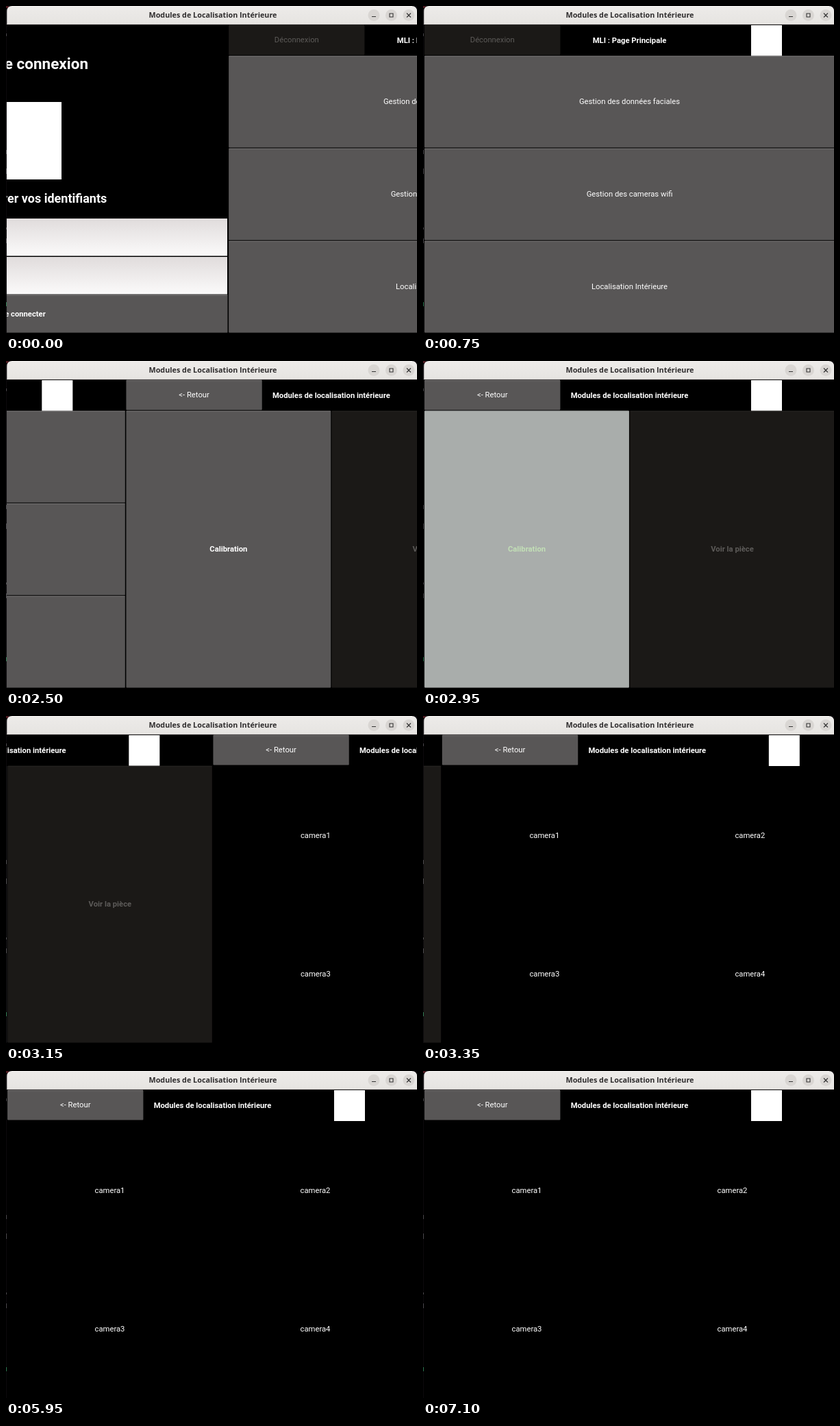
Write an HTML page that moves like this. It is 600 px wide and 477 px high and loops after 8 s.

```html
<!DOCTYPE html>
<html lang="fr">
<head>
<meta charset="utf-8">
<style>
html, body { margin: 0; width: 600px; height: 477px; overflow: hidden; background: #0b090c; }
svg { display: block; }
text { font: 11.25px Roboto, Arial, sans-serif; fill: #fff; text-anchor: middle; }
.bold { font-weight: 700; }
.off { fill: #5d5b59; }
.title { font: 700 10.8px "Open Sans", "Noto Sans", sans-serif; fill: #2f2d2e; }
.icon { fill: none; stroke: #333; stroke-width: 1.1; }
</style>
</head>
<body>
<svg width="600" height="477" viewBox="0 0 600 477">
  <defs>
    <linearGradient id="bar" x2="0" y2="1">
      <stop stop-color="#edebe9"/><stop offset="1" stop-color="#e6e4e1"/>
    </linearGradient>
    <linearGradient id="field" x2="0" y2="1">
      <stop stop-color="#e0dcdc"/><stop offset="1" stop-color="#fbfafa"/>
    </linearGradient>
  </defs>
  <g id="edge"></g>
  <svg id="pages" x="1" y="27" width="599" height="450" viewBox="1 27 599 450"></svg>
  <path d="M1.3 27V8Q1.3 0 9 0H592Q600 0 600 8V27Z" fill="url(#bar)"/>
  <path d="M8 .4H593" stroke="#f9f8f7" stroke-width=".8"/>
  <path d="M1.3 26.6H600" stroke="#cfccc9" stroke-width=".8"/>
  <text class="title" x="302" y="17">Modules de Localisation Intérieure</text>
  <g fill="#d9d6d3">
    <circle cx="537" cy="13.5" r="8.5"/><circle cx="562.5" cy="13.5" r="8.5"/><circle cx="588" cy="13.5" r="8.5"/>
  </g>
  <path class="icon" d="M534 15.5h6M560 11h5v5h-5zM585 10.5l6 6m0-6l-6 6"/>
</svg>
<script>
const LOOP = 8000, STEP = 50, SLIDE = 400, WIDTH = 600;
const X0 = 1.5, TOP = 27, BODY = 72, BOTTOM = 477, INSET = 0.6;
const GREY = '#585656', DARK = '#1b1917', PRESSED = '#a9adab';

const rect = (x, y, w, h, fill, extra = '') =>
  `<rect x="${x}" y="${y}" width="${w}" height="${h}" fill="${fill}" ${extra}/>`;

const label = (s, x, y, cls = '', size = 0) =>
  `<text x="${x}" y="${y}" class="${cls}"${size ? ` style="font-size:${size}px"` : ''}>${s}</text>`;

function button(s, x, y, w, h, { cls = '', off = false, id = '' } = {}) {
  const fill = off ? DARK : GREY;
  const shine = off ? '#242220' : '#706e6e';
  const body = rect(x + INSET, y + INSET, w - 2 * INSET, h - 2 * INSET, fill, 'rx="1"');
  const line = rect(x + 1, y + 1, w - 2, 1, shine);
  const text = label(s, x + w / 2, y + h / 2 + 3.9, cls + (off ? ' off' : ''));
  return `<g id="${id}">${body}${line}${text}</g>`;
}

const header = (action, name, off = false) =>
  button(action, X0, TOP, 199.5, 45, { off }) +
  label(name, 301.5, 54, 'bold') +
  rect(479, 28, 45, 45, '#fff');

const login =
  label('Page de connexion', 301, 91.5, 'bold', 22.5) +
  rect(244, 140, 114, 113, '#fff') +
  label('Veuillez entrer vos identifiants', 301, 287, 'bold', 18) +
  rect(2, 310, 598, 54.5, 'url(#field)') +
  rect(2, 366, 598, 54.5, 'url(#field)') +
  button('Se connecter', X0, 420.5, WIDTH, 56.5, { cls: 'bold' });

const main =
  header('Déconnexion', 'MLI : Page Principale', true) +
  ['Gestion des données faciales', 'Gestion des cameras wifi', 'Localisation Intérieure']
    .map((s, i) => button(s, X0, BODY + i * 135, WIDTH, 135, { id: 'item' + i })).join('');

const systemName = 'Modules de localisation intérieure';
const system =
  header('&lt;- Retour', systemName) +
  button('Calibration', X0, BODY, 300, BOTTOM - BODY, { cls: 'bold', id: 'calib' }) +
  button('Voir la pièce', X0 + 300, BODY, 300, BOTTOM - BODY, { cls: 'bold', off: true });

const cameras =
  header('&lt;- Retour', systemName) +
  [1, 2, 3, 4].map(n =>
    label('camera' + n, X0 + (n % 2 ? 150 : 450), n < 3 ? 177.5 : 380)).join('');

const root = document.getElementById('pages');
root.innerHTML = [login, main, system, cameras]
  .map(p => `<g>${rect(X0 - 1, TOP, WIDTH + 1, 450, '#000')}${p}</g>`).join('');
const pages = [...root.children];

// Slivers of the desktop left of the window
document.getElementById('edge').innerHTML =
  [[40, 4], [210, 6], [237, 8], [323, 3], [339, 7]]
    .map(([y, h]) => rect(0, y, 1, h, '#4a484c')).join('') +
  rect(0, 432, 1, 6, '#2c7a50') + rect(0, 0, 4, 3, '#4a1a20');

// Moment at which each page has fully arrived
const arrivals = [293.5, 2715, 3433];
const presses = [
  { id: 'item2', from: 2200, to: 2315 },
  { id: 'calib', from: 2950, to: 3033 },
].map(p => {
  const [body, line, text] = document.getElementById(p.id).children;
  return { ...p, body, line, text };
});

function slideOffset(t, end) {
  const left = Math.min(1, Math.max(0, (end - t) / SLIDE));
  return WIDTH * left * left;
}

function draw(t) {
  let current = 0;
  arrivals.forEach((end, i) => { if (t > end - SLIDE) current = i + 1; });
  const off = slideOffset(t, arrivals[current - 1]);
  pages.forEach((g, i) => {
    const x = off + (i - current) * WIDTH;
    const shown = i === current || (i === current - 1 && off > 0);
    g.style.display = shown ? '' : 'none';
    g.setAttribute('transform', `translate(${x.toFixed(2)} 0)`);
  });
  for (const p of presses) {
    const down = t >= p.from && t < p.to;
    p.body.setAttribute('fill', down ? PRESSED : GREY);
    p.line.style.display = down ? 'none' : '';
    p.text.style.fill = down ? '#c2dfb6' : '';
  }
}

const start = performance.now();
function tick() {
  const t = (performance.now() - start) % LOOP;
  draw(Math.floor(t / STEP) * STEP);
  requestAnimationFrame(tick);
}
tick();
</script>
</body>
</html>
```
